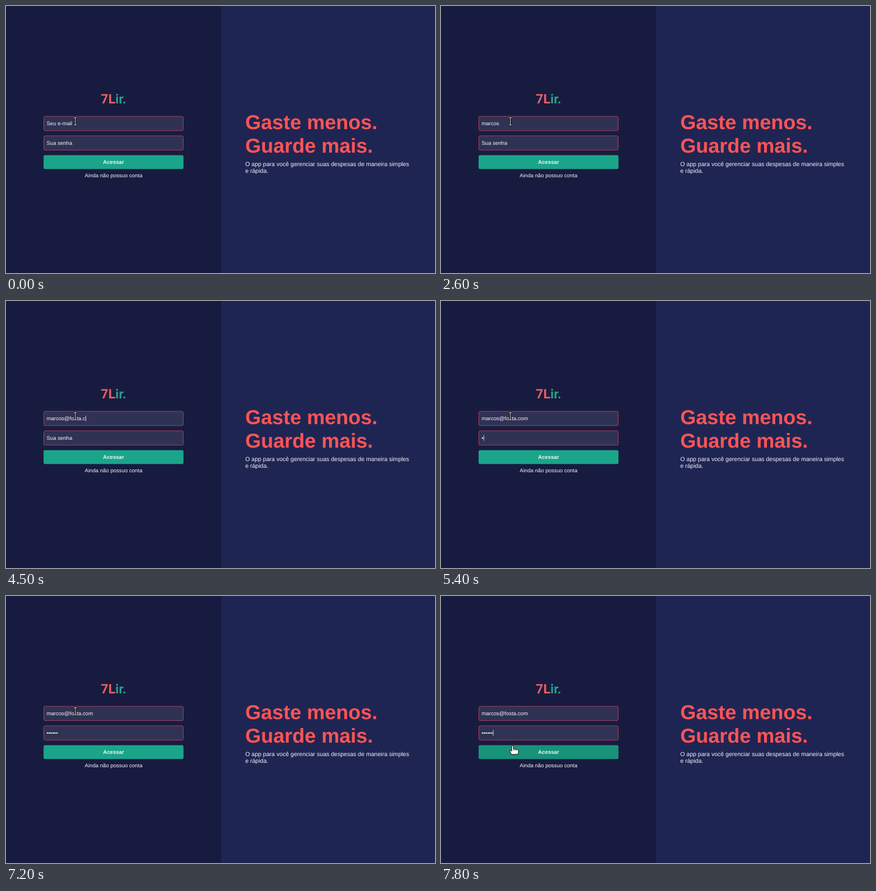
Write an HTML page that moves like this. It is 766 px wide and 477 px high and loops after 8000 ms.

```html
<!DOCTYPE html>
<html lang="pt-BR">
<head>
<meta charset="utf-8">
<title>Login</title>
<style>
  html, body { margin: 0; width: 100%; height: 100%; overflow: hidden; background: #181b40; }
  svg { display: block; width: 766px; height: 477px; }
  text { font: 9.6px "Liberation Sans", Arial, sans-serif; fill: #f3f3f7;
         text-rendering: geometricPrecision; white-space: pre; }
  .field { fill: #303254; stroke: #a2415a; stroke-width: 1; }
  .mid { text-anchor: middle; }
  .bold { font-weight: 700; }
  .logo { font: 700 23.2px Roboto, "Open Sans", sans-serif; }
  .title { font-size: 36px; font-weight: 700; fill: #fd5456; }
  .lead { font-size: 10.56px; }
</style>
</head>
<body>
<svg viewBox="0 0 766 477">
  <rect width="384" height="477" fill="#181b40"/>
  <rect x="384" width="382" height="477" fill="#1f2553"/>

  <text class="logo mid" x="192" y="174"><tspan fill="#f05f62">7L</tspan><tspan fill="#2a9d89">ir.</tspan></text>

  <rect class="field" x="67.5" y="197.1" width="249" height="25.6" rx="2.5"/>
  <rect class="field" x="67.5" y="231.9" width="249" height="25.7" rx="2.5"/>
  <text id="mail" x="72.4" y="213"></text>
  <text id="pass" x="72.4" y="248"></text>
  <rect id="caret" width=".9" height="10" fill="#dcdce6"/>

  <rect id="button" x="67.1" y="266.4" width="249.8" height="24.8" rx="2.6"/>
  <text class="mid bold" x="192" y="282.2">Acessar</text>
  <text class="mid" x="192" y="306.2">Ainda não possuo conta</text>

  <text class="title" x="427.2" y="220">Gaste menos.</text>
  <text class="title" x="427.2" y="262">Guarde mais.</text>
  <text class="lead" x="427.2" y="286">O app para você gerenciar suas despesas de maneira simples</text>
  <text class="lead" x="427.2" y="298.1">e rápida.</text>

  <g id="beam" fill="none">
    <path d="M-2.5-6.5H2.5M-2.5 6.5H2.5M0-6.5V6.5" stroke="#000" stroke-width="3.2"/>
    <path d="M-2.3-6.5H2.3M-2.3 6.5H2.3M0-6.5V6.5" stroke="#fff" stroke-width="1"/>
  </g>
  <g id="hand" stroke="#000" stroke-linejoin="round">
    <path fill="#fff" d="M-1.6 1Q0-.8 1.6 1V6Q3 4.6 4.4 6.2Q6 5 7.2 6.8Q9.8 5.6 10.6 8.2V12Q10 13.6 9.4 15.6H-2Q-3.2 12.8-4.8 10.4Q-5.4 7.4-3.2 8.4L-1.6 10Z"/>
    <path fill="none" stroke-width=".8" d="M1.6 6V9M4.4 6.2V9M7.2 6.8V9.2"/>
  </g>
</svg>
<script>
const LOOP = 8000, TICK = 100, BLINK = 600, FOCUS_PASS = 4900;
const ADDRESS = "marcos@fosta.com";
const $ = id => document.getElementById(id);
const [mail, pass, caret, button, beam, hand] =
  ["mail", "pass", "caret", "button", "beam", "hand"].map($);

const snap = t => Math.floor(t / TICK) * TICK;
const clamp = v => Math.min(1, Math.max(0, v));
const mix = (a, b, k) => a + (b - a) * k;

// key times of a run of typing at an even pace
const burst = (count, start, pace) =>
  Array.from({ length: count }, (_, i) => snap(start + i * pace));

const mailKeys = [
  ...burst(6, 1200, 150),
  ...burst(1, 2900, 0),
  ...burst(6, 3300, 160),
  ...burst(3, 4500, 100)
];
const passKeys = burst(6, 5400, 240);
// each event restarts the blinking; the first one only sets its phase
const events = [-1.5 * BLINK, ...mailKeys, FOCUS_PASS, ...passKeys];

const typedBy = (keys, t) => keys.filter(k => k <= t).length;

function show(el, text) {
  if (el.textContent !== text) el.textContent = text;
}

function drawForm(t) {
  const typed = typedBy(mailKeys, t), dots = typedBy(passKeys, t);
  show(mail, typed ? ADDRESS.slice(0, typed) : "Seu e-mail");
  show(pass, dots ? "•".repeat(dots) : "Sua senha");

  const onPass = t >= FOCUS_PASS;
  const empty = !(onPass ? dots : typed);
  const idle = t - events.findLast(e => e <= t);
  caret.setAttribute("x", 72.7 + (empty ? 0 : (onPass ? pass : mail).getComputedTextLength()));
  caret.setAttribute("y", onPass ? 239.6 : 204.8);
  caret.setAttribute("opacity", idle % (2 * BLINK) < BLINK ? 1 : 0);
}

function drawPointer(t) {
  const u = clamp((snap(t) - 7300) / 500);
  const k = 1 - (1 - u) ** 2;
  const over = k > 0.9 ? 1 : 0;
  const hover = clamp((u - 0.6) / 0.4);
  button.setAttribute("fill",
    `rgb(${mix(26, 23, hover)} ${mix(165, 147, hover)} ${mix(138, 122, hover)})`);
  beam.setAttribute("opacity", 1 - over);
  hand.setAttribute("opacity", over);
  for (const c of [beam, hand])
    c.setAttribute("transform", `translate(${mix(123.8, 127.7, k)} ${mix(206, 267.4, k)})`);
}

const start = performance.now();
function tick() {
  const t = (performance.now() - start) % LOOP;
  drawForm(t);
  drawPointer(t);
  requestAnimationFrame(tick);
}
tick();
</script>
</body>
</html>
```
